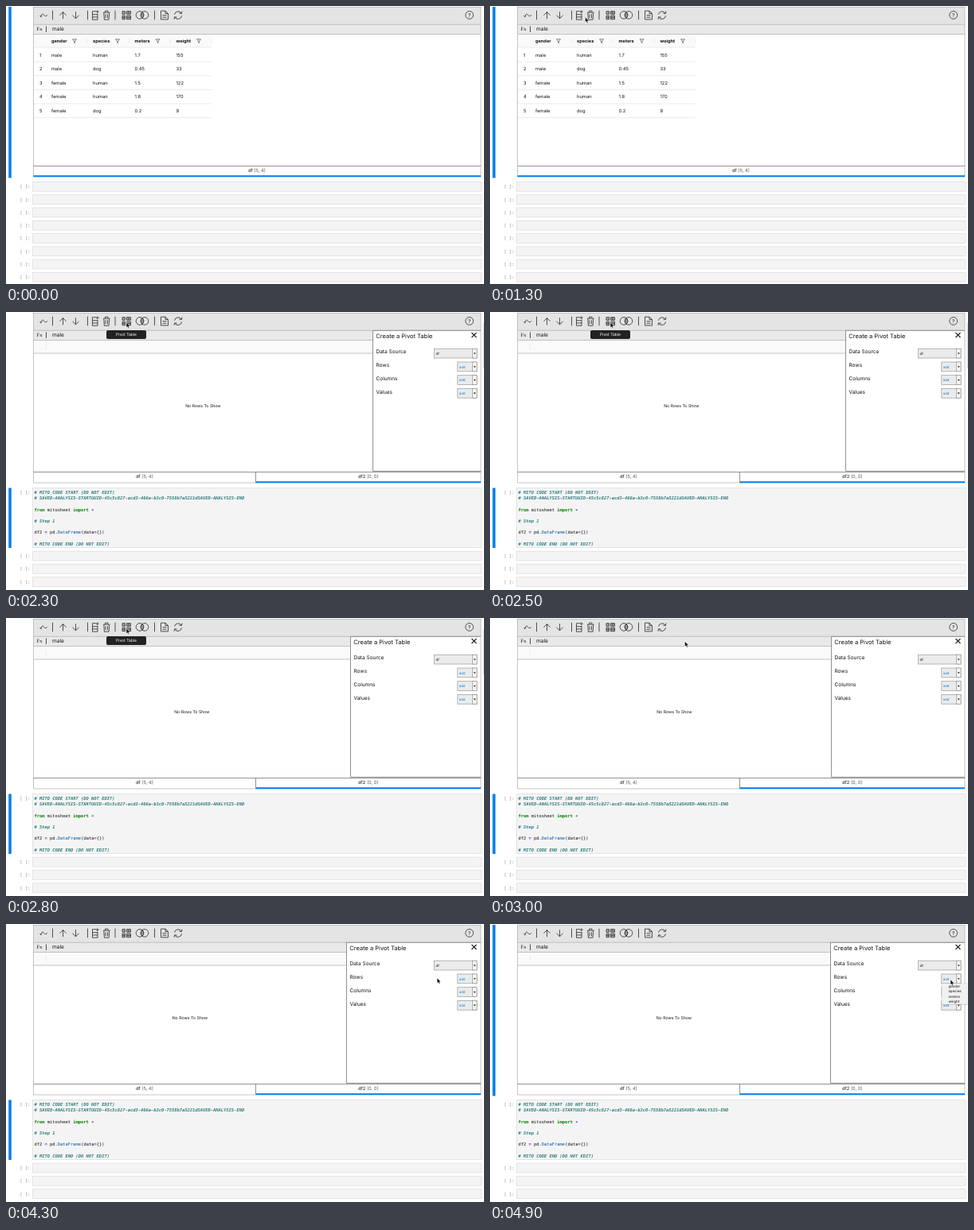
An HTML page that plays this animation: 600x350 px, repeating every 5000 ms.

```html
<!DOCTYPE html>
<html lang="en">
<head>
<meta charset="utf-8">
<title>Pivot table demo</title>
<style>
html, body { margin: 0; width: 100%; height: 100%; overflow: hidden; background: #fff; }
svg { display: block; width: 600px; height: 350px; text-rendering: geometricPrecision; }
text { font: 5.8px Inter, sans-serif; fill: #111; white-space: pre; }
.line { fill: none; stroke: #333; stroke-width: .85; }
.rule { fill: none; stroke: #e2e2e2; stroke-width: .7; }
.edge { fill: none; stroke: #777; stroke-width: .8; }
.soft { fill: none; stroke: #b4b4b4; stroke-width: .8; }
.head { font-weight: 700; font-size: 5.6px; }
.label { font-size: 6.5px; }
.code, .prompt { font: 5.424px "DejaVu Sans Mono", monospace; }
.prompt { fill: #888; }
.cell { fill: #f4f4f4; stroke: #dedede; stroke-width: .8; }
.comment { fill: #2f7c7c; font-style: italic; font-weight: 700; }
.key { fill: #008000; font-weight: 700; }
.op { fill: #7a2bbb; font-weight: 700; }
.prop { fill: #0055aa; }
.dim { fill: #555; }
.blue { fill: #0b7fee; }
</style>
</head>
<body>
<svg viewBox="0 0 600 350">
  <rect x="34.5" y="1.5" width="561.5" height="213.5" fill="#fff"/>
  <rect x="34.5" y="1.5" width="561.5" height="22" fill="#e4e4e4"/>
  <rect x="34.5" y="23.5" width="561.5" height="12" fill="#e9e9e9"/>
  <path class="soft" d="M34 1.5H596.5M34.5 23.3H596M34.5 35.5H596"/>

  <g class="line" transform="translate(0 -.3)">
    <path d="M42.5 12.5l1.2 1.5 1.6-1.5M43.7 13.6C45 9 47 10.5 48 12s2.5 1.5 4-.5"/>
    <path d="M58.5 6V17.500M102.5 6V17.500M137 6V17.500M186.500 6V17.500"/>
    <path d="M71.500 16.500V8M67.500 12l4-4.200 4 4.200M87.500 7.500V16M83.500 12l4 4.200 4-4.200"/>
    <path d="M113 7H108.500V17.500H115V10M113 7.500h3.500M114.800 5.800v3.500M108.500 11h6.500M108.500 14.200h6.500"/>
    <path d="M122 8.500h8.500M124.500 8.200V6.500h3.500v1.700M122.800 8.800l.6 8.700h5.700l.6-8.700M125 10.500v5M127.500 10.500v5"/>
    <path fill="#aaa" d="M146 7h3.500v3.500H146zM151.500 7h5v3.500h-5zM146 12.500h3.500v4.500H146zM151.500 12.500h5v4.500h-5zM146 14.700h3.500M154 7v3.500M151.500 14.700h5"/>
    <circle cx="168" cy="11.700" r="4.800"/><circle cx="174" cy="11.700" r="4.800"/>
    <path d="M171 8a4.800 4.800 0 0 1 0 7.400a4.800 4.800 0 0 1 0-7.400z" fill="#999"/>
    <path d="M194.500 6.500h5.500l3.500 3.300v7.400h-9zM200 6.500v3.300h3.500M196.500 12h5M196.500 14.500h5"/>
    <path d="M211.500 11a4.700 4.700 0 0 1 8.700-1.500M220.500 12.500a4.700 4.700 0 0 1-8.700 2M221 6.800l-.6 3-3-.4M211 17l.6-2.900 3 .4"/>
    <circle cx="581.700" cy="11.700" r="4.900"/>
  </g>
  <text x="579.9" y="13.9" style="font-size:6.5px">?</text>
  <text x="38.6" y="30.7" style="font:6.5px 'Liberation Serif',serif">Fx</text>
  <path class="line" d="M50.5 25.5V33"/>
  <text x="58" y="31.3" style="font-size:6.6px">male</text>

  <g id="sheet"></g>
  <g id="pivot">
    <rect x="34.5" y="36" width="561.5" height="16" fill="#fafafa"/>
    <path class="soft" d="M34.5 52H596"/>
    <path class="rule" d="M50.5 40.5v7"/>
    <text id="empty" y="120.3" text-anchor="middle" style="font-size:5.2px">No Rows To Show</text>
    <g id="panel">
      <rect y="23.5" width="180" height="177" fill="#fff"/>
      <path class="edge" d="M180 23.3H0V200.3H180"/>
      <text x="3.8" y="33.3" style="font-size:7.5px">Create a Pivot Table</text>
      <g id="labels"></g>
    </g>
    <rect x="596.2" width="4" height="219" fill="#fff"/>
    <path class="line" style="stroke:#222;stroke-width:1.1" d="M584.5 26l6 6M590.5 26l-6 6"/>
    <g id="selects"></g>
  </g>

  <path class="soft" d="M34.5 1V215M596 1V215"/>
  <path class="edge" d="M34.5 201.5H596"/>
  <g id="oneTab">
    <text x="304" y="209.3">df <tspan class="dim">(5, 4)</tspan></text>
    <rect class="blue" x="34.5" y="213.2" width="561.5" height="2.1"/>
  </g>
  <g id="twoTabs">
    <path class="edge" d="M313.5 201.5V215"/>
    <path class="soft" d="M34.5 215H314"/>
    <text x="163" y="209.3">df <tspan class="dim">(5, 4)</tspan></text>
    <text x="442" y="209.3">df2 <tspan class="dim">(0, 0)</tspan></text>
    <rect class="blue" x="313.5" y="213.2" width="282.5" height="2.1"/>
  </g>

  <g id="blanks"></g>
  <g id="script"></g>
  <rect class="blue" id="bar" x="3.2" width="3.6"/>
  <rect id="thumb" x="598.6" y="14" width="1.4" height="57" fill="#ddd"/>

  <g id="menu">
    <rect x="566.8" y="76" width="34" height="26" opacity=".12"/>
    <rect x="567" y="75" width="34" height="26" fill="#f1f1f1" stroke="#ccc" stroke-width=".5"/>
  </g>
  <g id="tip">
    <rect x="126" y="23" width="50" height="11" rx="2" fill="#222"/>
    <text x="151" y="30.4" text-anchor="middle" style="font-size:5px;fill:#fff">Pivot Table</text>
  </g>
  <path id="cursor" d="M0 0V6.6L1.5 5.3 2.5 7.5 3.6 7 2.7 4.9H4.7Z" stroke="#fff" stroke-width=".5"/>
</svg>
<script>
const $ = id => document.getElementById(id);
const text = (x, y, s, cls = '') => `<text x="${x}" y="${y}" class="${cls}">${s}</text>`;
const span = (cls, s) => `<tspan class="${cls}">${s}</tspan>`;
const box = (y, h) =>
  `<rect class="cell" x="33.5" y="${y}" width="563.5" height="${h}"/>` +
  text(17.5, y + 7.9, '[ ]:', 'prompt');

// Data frame
const colX = [57, 109, 161.5, 213.5];
const filterX = [86, 140, 190.5, 242];
const names = ['gender', 'species', 'meters', 'weight'];
const rows = [
  ['male', 'human', '1.7', '155'],
  ['male', 'dog', '0.45', '33'],
  ['female', 'human', '1.5', '122'],
  ['female', 'human', '1.8', '170'],
  ['female', 'dog', '0.2', '9'],
];
let sheet = '<rect x="35" y="36" width="223" height="16" fill="#fafafa"/><path class="rule" d="M35 52H258"/>';
names.forEach((name, i) => {
  sheet += text(colX[i], 45.9, name, 'head') +
    `<path class="line" style="stroke-width:.6" d="M${filterX[i] - 2.5} 41.8h5l-1.9 2.4v2.3l-1.2-.7v-1.6z"/>` +
    `<path class="rule" d="M${102 + 52 * i} 41v6"/>`;
});
rows.forEach((row, r) => {
  const y = 63.6 + 17.6 * r;
  sheet += text(42, y, r + 1) + row.map((v, i) => text(colX[i], y, v)).join('') +
    `<path class="rule" d="M35 ${y + 6.6}H258"/>`;
});
$('sheet').innerHTML = sheet;

// Pivot panel
$('labels').innerHTML = ['Data Source', 'Rows', 'Columns', 'Values']
  .map((s, i) => text(4, 52.4 + 16.8 * i, s, 'label')).join('');
const select = (x, y, s, color) =>
  `<rect x="${x}" y="${y}" width="${591 - x}" height="11.8" fill="#ebebeb" stroke="#999" stroke-width=".7"/>
   <rect x="585.5" y="${y}" width="5.5" height="11.8" fill="#f4f4f4" stroke="#888" stroke-width=".6"/>
   <path d="M586.9 ${y + 5.2}h2.7l-1.35 1.9z"/>
   <text x="${x + 2}" y="${y + 7.5}" style="font-size:4.3px;fill:${color}">${s}</text>`;
$('selects').innerHTML = select(537.5, 46.2, 'df', '#111') +
  [0, 1, 2].map(i => select(566.8, 63 + 16.7 * i, 'add', '#0b80e8')).join('');
$('menu').innerHTML += names
  .map((s, i) => `<text x="575.5" y="${79.6 + 6.5 * i}" style="font-size:4.4px">${s}</text>`).join('');

// Notebook cells
$('blanks').innerHTML = Array.from({ length: 8 }, (_, i) => box(221.5 + 16.27 * i, 11.8)).join('');
const code = [
  span('comment', '# MITO CODE START (DO NOT EDIT)'),
  span('comment', '# SAVED-ANALYSIS-STARTUUID-45c5c827-acd3-466a-b3c0-7558b7a5221dSAVED-ANALYSIS-END'),
  '',
  `${span('key', 'from')} mitosheet ${span('key', 'import')} <tspan class="op" dy="1.1">*</tspan>`,
  '',
  span('comment', '# Step 1'),
  '',
  `df2 ${span('op', '=')} pd.${span('prop', 'DataFrame')}(data${span('op', '=')}{})`,
  '',
  span('comment', '# MITO CODE END (DO NOT EDIT)'),
];
$('script').innerHTML = box(221.5, 75) +
  code.map((s, i) => text(35.5, 229 + 7.17 * i, s, 'code')).join('') +
  [0, 1, 2].map(i => box(301.2 + 16.3 * i, 11.8)).join('');

// Pointer path: time, x, y
const path = [
  [700, 9, 190], [900, 32, 105], [1200, 95, 18], [1300, 119.5, 14], [1800, 150, 13],
  [1900, 151, 13], [2800, 151, 13], [3300, 385, 54], [3500, 427, 60],
  [3600, 427, 60], [4200, 534, 67.5], [4800, 577, 70], [4900, 578, 70],
];
function pointAt(t) {
  const n = path.findIndex(p => p[0] > t);
  if (n < 0) return path[path.length - 1].slice(1);
  if (n === 0) return path[0].slice(1);
  const [t0, x0, y0] = path[n - 1], [t1, x1, y1] = path[n];
  const k = (t - t0) / (t1 - t0);
  return [x0 + (x1 - x0) * k, y0 + (y1 - y0) * k];
}

const LOOP = 5000, STEP = 100, OPEN = 2200, SLIDE = 900, MENU = 4900;
const show = (id, on) => { $(id).style.display = on ? '' : 'none'; };

function draw(t) {
  const open = t >= OPEN, menu = t >= MENU;
  ['pivot', 'twoTabs', 'script'].forEach(id => show(id, open));
  ['sheet', 'oneTab', 'blanks'].forEach(id => show(id, !open));
  show('menu', menu);
  show('tip', t >= 1600 && t < 2900);
  show('thumb', open && t < 2900);
  show('cursor', t >= path[0][0]);

  if (open) {
    const left = 1 - Math.min(1, (t - OPEN) / SLIDE);
    const edge = Math.round(428 + 42 * left * left);
    $('panel').setAttribute('transform', `translate(${edge - .5} 0)`);
    $('empty').setAttribute('x', (33.8 + edge) / 2);
  }
  const inScript = open && !menu;
  $('bar').setAttribute('y', inScript ? 221.5 : 1);
  $('bar').setAttribute('height', inScript ? 75.5 : 215.5);
  $('cursor').setAttribute('transform', `translate(${pointAt(t).join(' ')})`);
}

const start = performance.now();
function tick() {
  const t = (performance.now() - start) % LOOP;
  draw(Math.floor(t / STEP) * STEP);
  requestAnimationFrame(tick);
}
tick();
</script>
</body>
</html>
```
